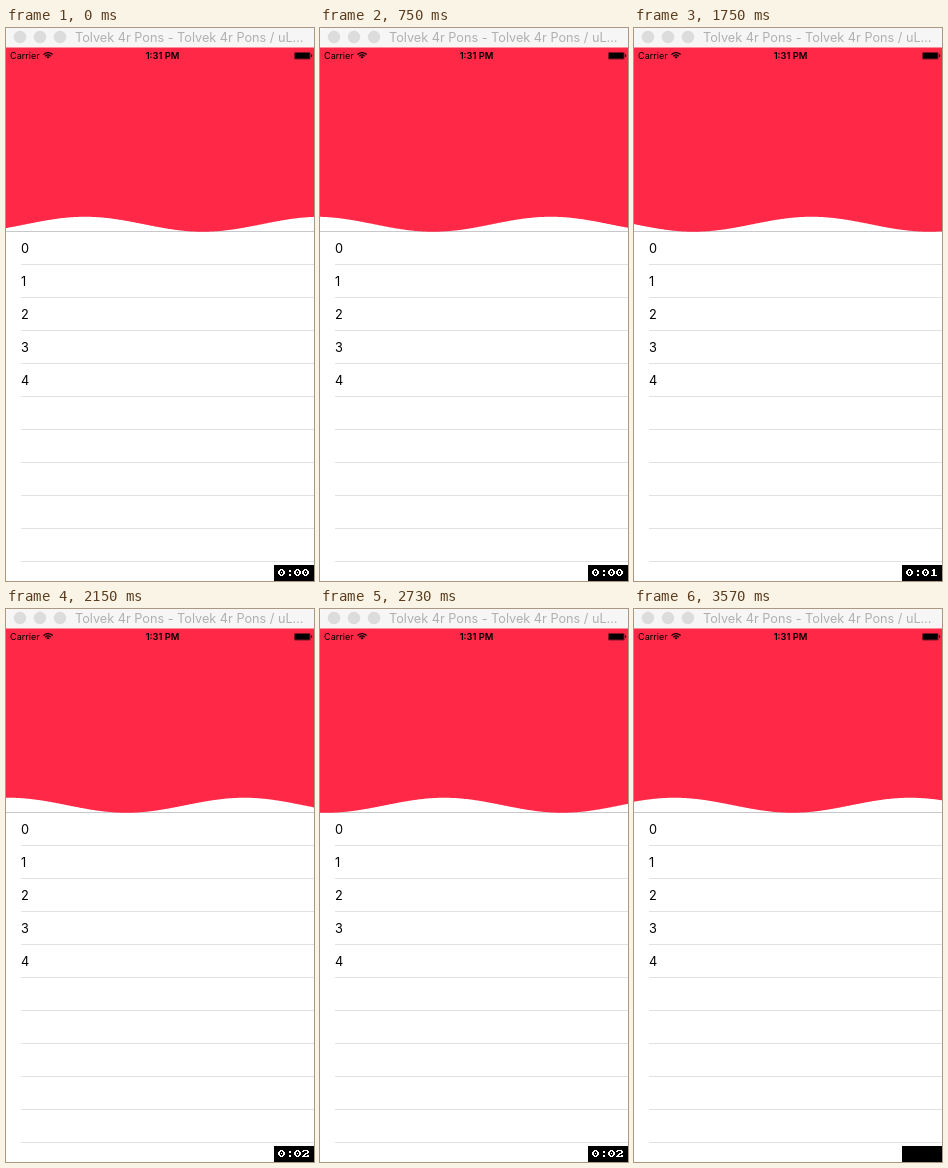
Write an HTML page with a canvas that moves like this. It is 308 px wide and 553 px high and loops after 3.67 s.

```html
<!DOCTYPE html>
<html lang="en">
<head>
<meta charset="utf-8">
<title>Wave header</title>
<style>
  html, body { margin: 0; width: 100%; height: 100%; overflow: hidden; background: #fff; }
  canvas { display: block; width: 308px; height: 553px; }
</style>
</head>
<body>
<canvas id="stage"></canvas>
<script>
const W = 308, H = 553, LOOP = 3670;
const RED = '#ff2947';
const SANS = 'Inter, Roboto, sans-serif';
const TOP = 19.5, ROW = 33, LIST_Y = 203;

const canvas = document.getElementById('stage');
const dpr = window.devicePixelRatio || 1;
canvas.width = W * dpr;
canvas.height = H * dpr;
const ctx = canvas.getContext('2d');
ctx.scale(dpr, dpr);

// Each second of the clock: when it starts and how long a wave step lasts
const beats = [
  { at: 0, pace: 150 },
  { at: 1000, pace: 150 },
  { at: 2150, pace: 145 },
  { at: 3270, pace: 150 }
];
const LEAD = 5, CLOCK_END = 3570;

const wave = { mid: 196.25, amp: 7.5, unit: 37.5, crest: 79, step: 0.81 };

// Clock digits as key points for a pen two pixels wide
const bowl = [[0, 1], [1, 0], [4, 0], [5, 1], [5, 2], [4, 3]];
const digits = [
  [[2, 0], [0, 2], [0, 4], [2, 6], [3, 6], [5, 4], [5, 2], [3, 0]],
  [[2, 1], [3, 0], [3, 6], [1, 6], [5, 6]],
  [...bowl, [3, 3], [0, 6], [5, 6], [5, 5]],
  [...bowl, [2, 3], [4, 3], [5, 4], [5, 5], [4, 6], [1, 6], [0, 5]]
];

function waveSteps(t) {
  return beats.reduce((sum, { at, pace }, i) => {
    const end = i + 1 < beats.length ? beats[i + 1].at : LOOP;
    const spent = Math.min(t, end) - at + LEAD;
    return sum + Math.max(0, Math.floor(spent / pace));
  }, 0);
}

function rect(x, y, w, h, color) {
  ctx.fillStyle = color;
  ctx.fillRect(x, y, w, h);
}

function text(str, x, y, size, color = '#000', weight = 400, align = 'left') {
  ctx.font = `${weight} ${size}px ${SANS}`;
  ctx.textAlign = align;
  ctx.fillStyle = color;
  ctx.fillText(str, x, y);
}

function roundBox(x, y, w, h, radii, color) {
  ctx.fillStyle = color;
  ctx.beginPath();
  ctx.roundRect(x, y, w, h, radii);
  ctx.fill();
}

function drawTitleBar() {
  roundBox(0, 0, W, 20, [4, 0, 0, 0], '#f6f6f6');
  ctx.strokeStyle = '#d2d2d2';
  ctx.lineWidth = 0.5;
  for (let i = 0; i < 3; i++) {
    ctx.beginPath();
    ctx.arc(14 + i * 20, 9, 5.9, 0, Math.PI * 2);
    ctx.fillStyle = '#dcdcdc';
    ctx.fill();
    ctx.stroke();
  }
  text('Tolvek 4r Pons - Tolvek 4r Pons / uL…', 69, 14, 12.7, '#b0b0b0');
}

function drawWifi(x, y) {
  const from = -Math.PI * 0.77, to = -Math.PI * 0.23;
  ctx.strokeStyle = ctx.fillStyle = '#000';
  ctx.lineWidth = 1.3;
  for (const r of [3.6, 6]) {
    ctx.beginPath();
    ctx.arc(x, y, r, from, to);
    ctx.stroke();
  }
  ctx.beginPath();
  ctx.moveTo(x, y);
  ctx.arc(x, y, 2.1, from, to);
  ctx.fill();
}

function drawStatusBar() {
  text('Carrier', 4, 31, 9.1);
  text('1:31 PM', 156.5, 31, 9.3, '#000', 600, 'center');
  drawWifi(42, 30.6);
  roundBox(288, 24, 16.6, 7.4, 1.5, 'rgba(0, 0, 0, 0.5)');
  roundBox(289, 25, 14.6, 5.4, 0.6, '#000');
  roundBox(305.1, 26.3, 1.1, 2.8, [0, 1, 1, 0], '#000');
}

function drawList() {
  rect(0, LIST_Y, W, 1, '#c8c8ca');
  for (let i = 0; i < 10; i++) {
    const y = LIST_Y + i * ROW;
    rect(15, y + ROW, W - 15, 1, '#e1e1e3');
    if (i < 5) text(String(i), 15, y + 22, 12.75);
  }
}

function drawWave(n) {
  ctx.fillStyle = RED;
  ctx.beginPath();
  ctx.moveTo(0, TOP);
  for (let x = 0; x <= W; x++) {
    const phase = (x - wave.crest) / wave.unit - n * wave.step;
    ctx.lineTo(x, wave.mid - wave.amp * Math.cos(phase));
  }
  ctx.lineTo(W, TOP);
  ctx.fill();
}

function drawDigit(d, x, y) {
  const points = digits[d];
  for (let i = 1; i < points.length; i++) {
    const [ax, ay] = points[i - 1], [bx, by] = points[i];
    const n = Math.max(Math.abs(bx - ax), Math.abs(by - ay));
    for (let k = 0; k <= n; k++) {
      rect(x + ax + (bx - ax) * k / n, y + ay + (by - ay) * k / n, 2, 1, '#fff');
    }
  }
  if (d === 0) rect(x + 3, y + 3, 1, 1, '#fff');
}

function drawClock(t) {
  rect(268, 537, 40, 16, '#000');
  if (t >= CLOCK_END) return;
  const second = beats.filter(b => b.at <= t).length - 1;
  drawDigit(0, 272, 541);
  rect(283, 542, 2, 2, '#fff');
  rect(283, 546, 2, 2, '#fff');
  drawDigit(0, 288, 541);
  drawDigit(second, 296, 541);
}

function draw(t) {
  rect(0, 0, W, H, '#fff');
  drawTitleBar();
  drawList();
  drawWave(waveSteps(t));
  drawStatusBar();
  drawClock(t);
}

const start = performance.now();
function loop() {
  draw((performance.now() - start) % LOOP);
  requestAnimationFrame(loop);
}
loop();
</script>
</body>
</html>
```
